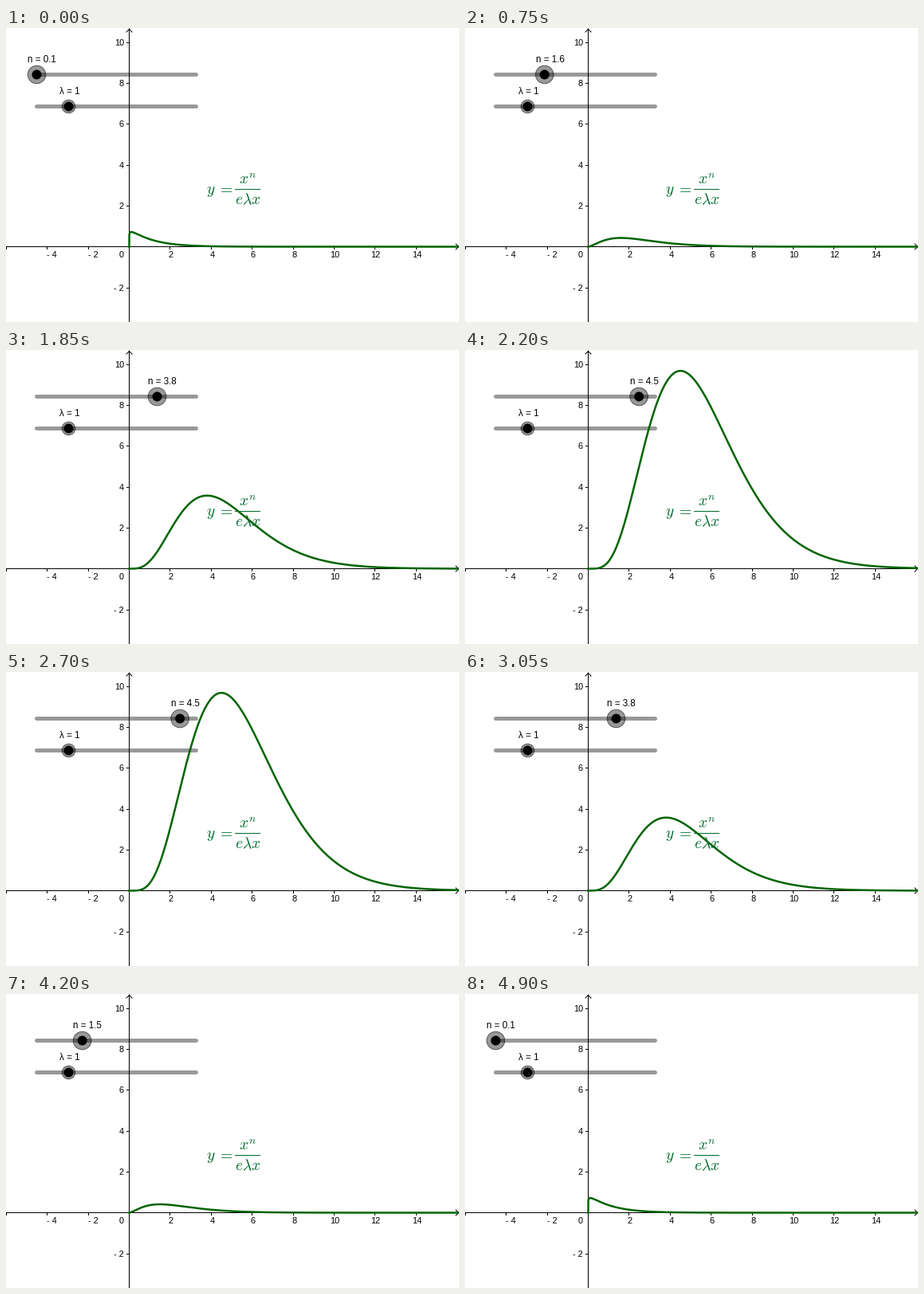
A matplotlib script that plays this animation: 568 px wide and 369 px high, repeating every 4950 ms.

```python
import numpy as np
import matplotlib.pyplot as plt
from matplotlib.animation import FuncAnimation
from matplotlib.patches import Circle

plt.rcParams["font.family"] = "Liberation Sans"
plt.rcParams["mathtext.fontset"] = "cm"

W, H, DPI = 568, 369, 100
PX = 72 / DPI                 # points per pixel
OX, OY, UNIT = 154.5, 274.5, 25.7
FRAMES, INTERVAL = 99, 50
GREEN, FORMULA = "#006400", "#006b2d"

fig = plt.figure(figsize=(W / DPI, H / DPI), dpi=DPI, facecolor="white")
ax = fig.add_axes([0, 0, 1, 1])
ax.set_xlim(0, W)
ax.set_ylim(H, 0)
ax.axis("off")


def line(xs, ys, width=1, color="black", **kw):
    # snapping would push half-pixel centres one pixel right and down
    return ax.plot(xs, ys, color=color, lw=width * PX, snap=False, **kw)[0]


def label(x, y, text, size=11, color="black", ha="left"):
    return ax.text(x, y, text, fontsize=size * PX, color=color, ha=ha,
                   va="baseline", zorder=6)


def number(v):
    return f"- {-v}" if v < 0 else str(v)


def draw_axes():
    line([0, W], [OY, OY], zorder=1)
    line([OX, OX], [1, H], zorder=1)
    line([W - 4, W - 0.5, W - 4], [OY - 3.5, OY, OY + 3.5], zorder=1)
    line([OX - 3.5, OX, OX + 3.5], [5, 1.5, 5], zorder=1)
    for v in range(-6, 15, 2):
        x = np.floor(OX + v * UNIT) + 0.5
        if v:
            line([x, x], [OY, OY + 3], zorder=1)
        if v and v > -6:
            label(x + (6 if v < 0 else 0.8), 288.5, number(v), ha="center")
    label(144.5, 288.5, "0", ha="center")
    for v in (-2, 2, 4, 6, 8, 10):
        y = np.floor(OY - v * UNIT + 0.55) + 0.5
        line([OX - 3, OX], [y, y], zorder=1)
        label(148, y + 3.5, number(v), ha="right")


def slider(y, x, radius):
    """Draw a track and return the knob's two circles."""
    line([38.5, 238.5], [y, y], 5, alpha=0.4, solid_capstyle="round", zorder=2)
    ring = Circle((x, y), radius, fc=(0, 0, 0, 0.4), ec=(0, 0, 0, 0.55),
                  lw=PX, zorder=4)
    dot = Circle((x, y), 6, fc="black", ec="none", zorder=5)
    ax.add_patch(ring)
    ax.add_patch(dot)
    return ring, dot


def draw_formula():
    label(250.7, 207.5, "$y$", 19.5, FORMULA)
    label(265, 207.5, "$=$", 19.5, FORMULA)
    label(292, 195.7, "$x^n$", 19.5, FORMULA)
    label(286.7, 221.4, r"$e\lambda x$", 19.5, FORMULA)
    line([287, 319], [202.5, 202.5], 1, FORMULA, solid_capstyle="butt",
         zorder=6)


draw_axes()
draw_formula()
knob = slider(58.5, 38.5, 11.3)
slider(98.5, 78.5, 8.3)
label(66.7, 83, "λ = 1", 11.6)
n_label = label(27, 43, "", 11.6)
curve = line([], [], 2.5, GREEN, zorder=3, solid_joinstyle="round")

right = 16.2 * np.linspace(0, 1, 600) ** 3
left = np.linspace(-6.1, 0, 400)[:-1]
both = np.concatenate([left, right])


def update(i):
    tenths = 1 + min(i, FRAMES - 1 - i)
    whole = tenths % 10 == 0
    n = tenths // 10 if whole else tenths / 10

    # whole powers are also defined for negative x
    xs = both if whole else right
    ys = np.clip(xs ** n * np.exp(-xs), -40, 40)
    curve.set_data(OX + xs * UNIT, OY - ys * UNIT)

    x = 38.5 + 200 * (tenths - 1) / 49
    for part in knob:
        part.center = (x, 58.5)
    n_label.set_text(f"n = {n:g}")
    n_label.set_x(x - 11.2)
    return (curve, n_label, *knob)


anim = FuncAnimation(fig, update, frames=FRAMES, interval=INTERVAL,
                     init_func=lambda: update(0), repeat=True)
plt.show()
```
